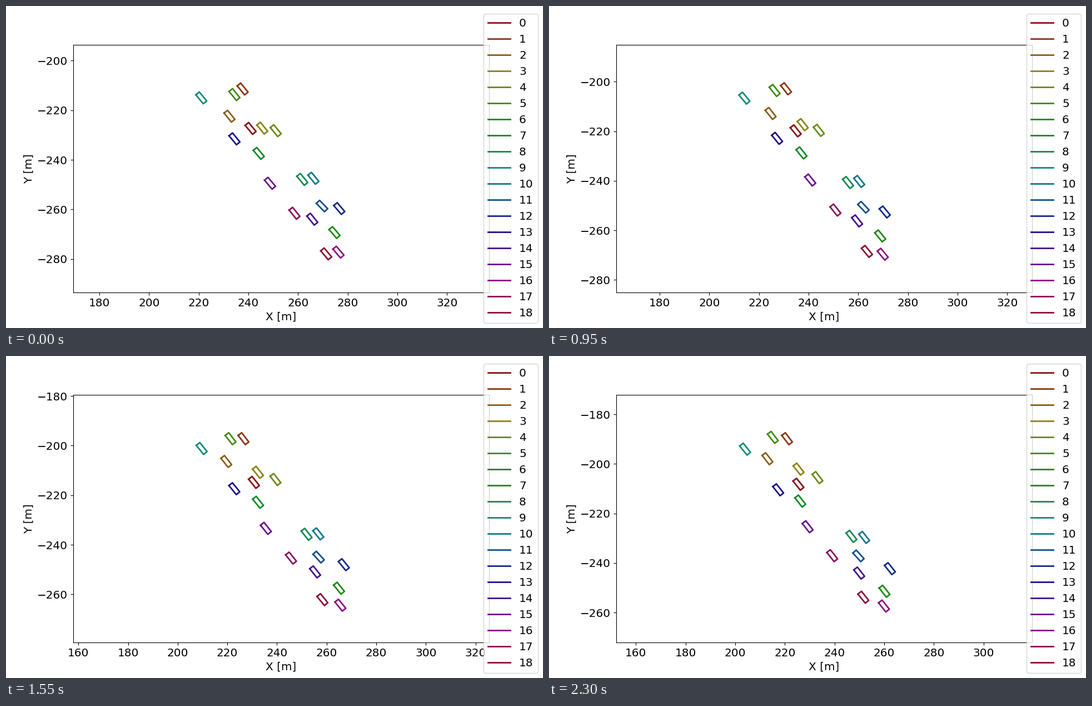
Animation, 966 px wide and 580 px high, one loop 2.35 s. Source, as a matplotlib script:

```python
import colorsys

import matplotlib.pyplot as plt
import numpy as np
from matplotlib.animation import FuncAnimation
from matplotlib.ticker import MultipleLocator

FRAMES = 47
INTERVAL = 50
HALF_HEIGHT = 50            # metres shown above and below the group centre
PX_PER_M = 4.466
LENGTH, WIDTH = 4.7, 1.8    # vehicle size in metres

# Group centre in metres at the start, middle and end of the loop.
CENTRE_X = (253.24, 244.76, 235.83)
CENTRE_Y = (-243.56, -233.23, -222.07)

# Each vehicle's place on screen (pixels) at the same three moments: x, then y.
TRACKS = np.array([
    (440.0, 444.6, 448.7, 220.5, 225.8, 231.0),
    (425.7, 426.7, 428.3, 149.5, 149.0, 149.0),
    (402.0, 397.9, 393.0, 198.5, 192.4, 185.0),
    (461.0, 455.4, 449.0, 220.0, 212.3, 203.7),
    (485.2, 485.3, 483.0, 224.5, 223.6, 219.0),
    (411.0, 405.2, 402.7, 159.5, 150.9, 146.5),
    (591.0, 596.9, 603.5, 408.0, 415.5, 423.7),
    (454.7, 454.0, 452.0, 265.5, 264.3, 261.3),
    (533.0, 538.9, 544.0, 312.3, 319.0, 324.8),
    (351.3, 351.7, 352.8, 165.5, 166.1, 167.8),
    (553.0, 559.3, 567.0, 310.3, 317.4, 326.7),
    (568.5, 564.7, 556.7, 360.3, 362.5, 360.0),
    (599.5, 605.2, 613.3, 364.8, 372.5, 383.0),
    (411.0, 410.4, 412.3, 239.3, 238.5, 241.0),
    (551.0, 554.9, 558.0, 384.0, 387.7, 391.0),
    (475.0, 469.1, 465.3, 319.3, 312.4, 307.5),
    (598.0, 600.8, 602.5, 443.3, 447.7, 450.3),
    (519.0, 514.4, 509.5, 373.3, 366.3, 359.7),
    (576.0, 571.1, 565.5, 446.5, 441.0, 434.5),
])
AXES_MID = (495.07, 292.9)


def through(start, mid, end, s):
    """Quadratic path through three values, and its slope, at s in 0..1."""
    a = 2 * (start - 2 * mid + end)
    b = end - start - a
    return start + b * s + a * s * s, b + 2 * a * s


def outline(x, y, heading):
    along = np.array([1, 1, -1, -1, 1]) * LENGTH / 2
    across = np.array([1, -1, -1, 1, 1]) * WIDTH / 2
    c, s = np.cos(heading), np.sin(heading)
    return x + along * c - across * s, y + along * s + across * c


plt.rcParams.update({"font.family": "DejaVu Sans", "font.size": 14.4})
fig, ax = plt.subplots(figsize=(9.66, 5.8), dpi=100)
ax.set_xlabel("X [m]")
ax.set_ylabel("Y [m]")
ax.xaxis.set_major_locator(MultipleLocator(20))
ax.yaxis.set_major_locator(MultipleLocator(20))

count = len(TRACKS)
cars = [
    ax.plot([], [], lw=2, label=str(i),
            color=colorsys.hls_to_rgb(i / count, 0.3, 0.8))[0]
    for i in range(count)
]
ax.legend(loc="center right", bbox_to_anchor=(1.13, 0.5))

box = ax.get_window_extent()
HALF_WIDTH = HALF_HEIGHT * box.width / box.height


def draw(frame):
    s = frame / (FRAMES - 1)
    cx, vx = through(*CENTRE_X, s)
    cy, vy = through(*CENTRE_Y, s)
    ax.set_xlim(cx - HALF_WIDTH, cx + HALF_WIDTH)
    ax.set_ylim(cy - HALF_HEIGHT, cy + HALF_HEIGHT)

    px, dpx = through(*TRACKS.T[:3], s)
    py, dpy = through(*TRACKS.T[3:], s)
    x = cx + (px - AXES_MID[0]) / PX_PER_M
    y = cy - (py - AXES_MID[1]) / PX_PER_M
    heading = np.arctan2(vy - dpy / PX_PER_M, vx + dpx / PX_PER_M)
    for car, *pose in zip(cars, x, y, heading):
        car.set_data(*outline(*pose))
    return cars


anim = FuncAnimation(fig, draw, frames=FRAMES, interval=INTERVAL,
                     repeat=True, repeat_delay=0, blit=False)
plt.show()
```
